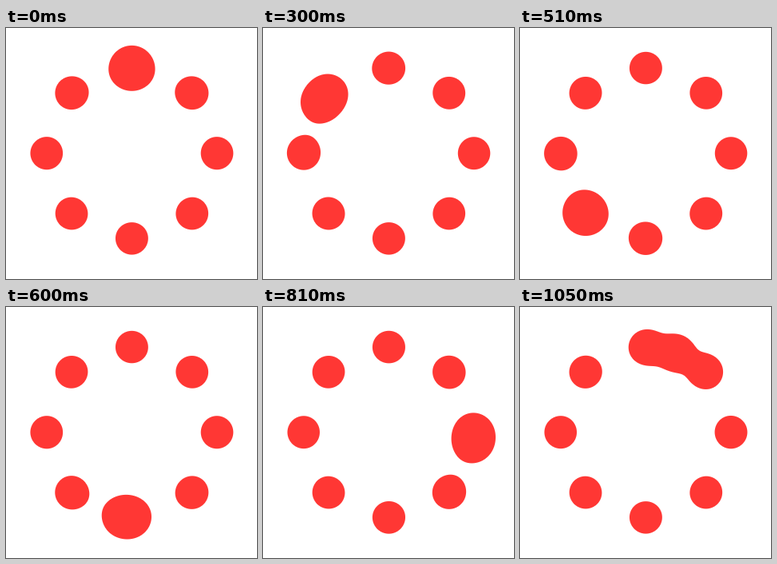
An HTML page with a canvas that plays this animation: 314 by 314 pixels, repeating every 1080 ms.

```html
<!DOCTYPE html>
<html lang="en">
<head>
<meta charset="utf-8">
<title>Metaball loader</title>
<style>
  html, body { margin: 0; height: 100%; overflow: hidden; background: #fff; }
  canvas { display: block; width: 100%; height: 100%; }
</style>
</head>
<body>
<canvas id="stage" width="314" height="314"></canvas>
<script>
const SIZE = 314, LOOP = 1080, STEP = 30;
const SWEEP = 1230;      // a full eased turn; the loop cuts it short
const CX = 157.4, CY = 156.7, ORBIT = 107;
const STRENGTH = 342;    // squared radius of a lone ball
const RED = [255, 55, 52];

const ctx = document.getElementById('stage').getContext('2d');
const image = ctx.createImageData(SIZE, SIZE);

// Angles run counterclockwise from the top.
const onOrbit = a => [CX - ORBIT * Math.sin(a), CY - ORBIT * Math.cos(a)];
const dots = Array.from({ length: 8 }, (_, i) => onOrbit(i * Math.PI / 4));

// Pixel coverage from the summed inverse-square field and its gradient.
function coverage(x, y, balls) {
  let field = 0, gx = 0, gy = 0;
  for (const [bx, by] of balls) {
    const dx = x - bx, dy = y - by;
    const d2 = dx * dx + dy * dy + 1e-6;
    const f = STRENGTH / d2;
    field += f;
    gx -= 2 * f * dx / d2;
    gy -= 2 * f * dy / d2;
  }
  if (field > 1.3) return 1;
  const edge = (field - 1) / (Math.hypot(gx, gy) + 1e-9);
  return Math.min(1, Math.max(0, edge + 0.5));
}

function draw(time) {
  const p = time / SWEEP;
  const turn = p * p * (3 - 2 * p);
  const balls = [...dots, onOrbit(turn * 2 * Math.PI)];
  let i = 0;
  for (let y = 0; y < SIZE; y++) {
    for (let x = 0; x < SIZE; x++) {
      const c = coverage(x + 0.5, y + 0.5, balls);
      for (const channel of RED) image.data[i++] = 255 + (channel - 255) * c;
      image.data[i++] = 255;
    }
  }
  ctx.putImageData(image, 0, 0);
}

const start = performance.now();
let shown = -1;
function tick() {
  const elapsed = (performance.now() - start) % LOOP;
  const time = Math.floor(elapsed / STEP) * STEP;
  if (time !== shown) draw(shown = time);
  requestAnimationFrame(tick);
}
tick();
</script>
</body>
</html>
```
